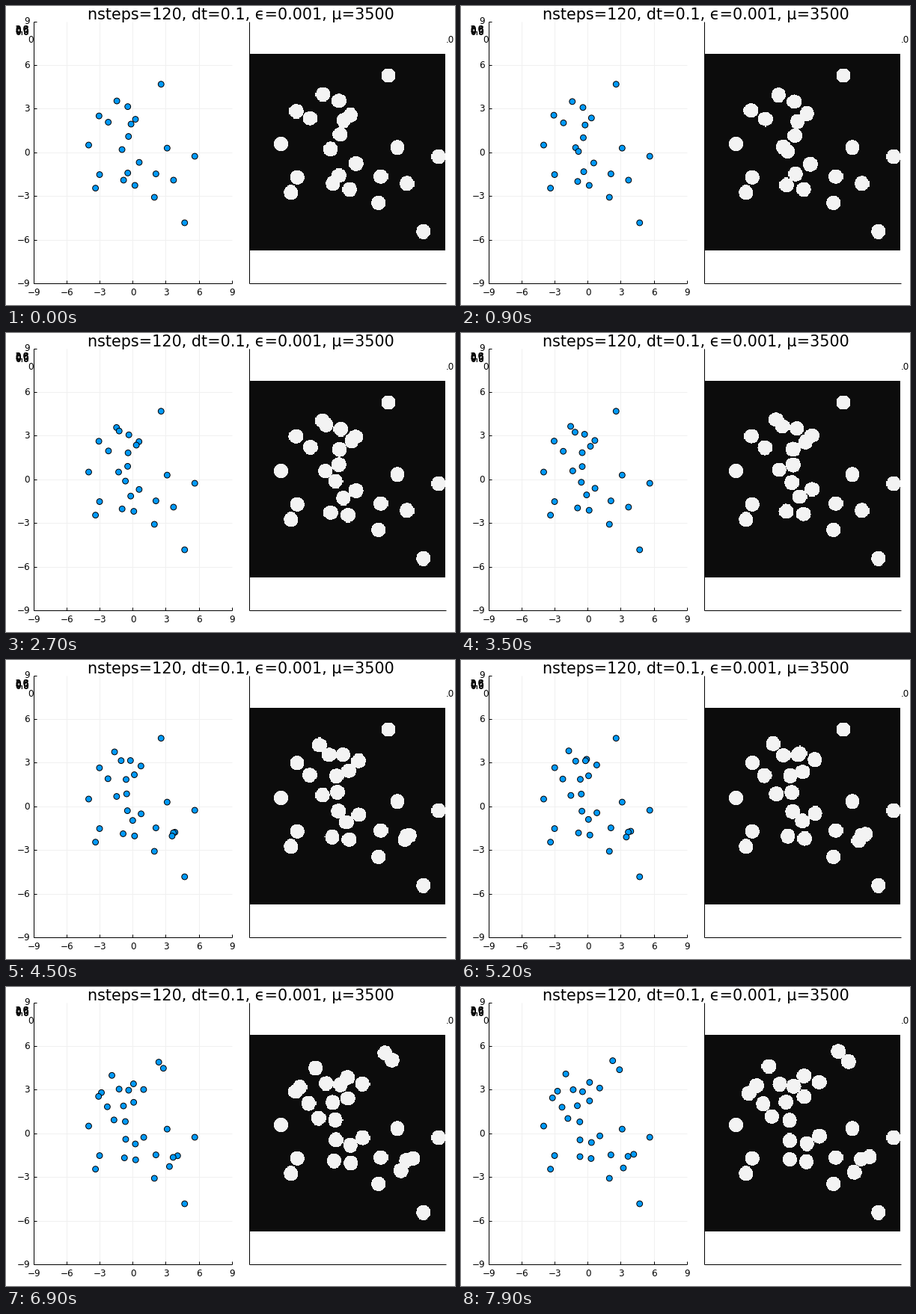
Recreate the animation shown at these times as a matplotlib script. Size 600 by 400 pixels, loop 8 s.

```python
import numpy as np
import matplotlib.pyplot as plt
from matplotlib.animation import FuncAnimation
from matplotlib.patches import Circle

FRAMES = 80
SPEED = 0.01   # drift per frame and axis
RADIUS = 0.45
PX = 0.72      # points per pixel at 100 dpi

LEFT, RIGHT, TOP, BOTTOM = 37, 301.7, 20.5, 371
CX, CY = (LEFT + RIGHT) / 2, (TOP + BOTTOM) / 2
SX, SY = (RIGHT - LEFT) / 18, (BOTTOM - TOP) / 18
FIELD = (325, 587, 326.8, 64.3)


class Cell:
    """Drifts along a heading, may rebound once and may divide."""
    every = []

    def __init__(self, x, y, *head, born=0):
        self.start = np.array([x, y])
        self.head = self.then = np.array(head or (0, 0))
        self.born, self.turn, self.end = born, FRAMES, FRAMES
        Cell.every.append(self)

    def rebound(self, frame, *head):
        self.turn, self.then = frame, np.array(head)
        return self

    def split(self, frame, *heads):
        self.end = frame
        x, y = self.at(frame)
        gap = 5 * SPEED
        return [Cell(x + gap * h[0], y + gap * h[1], *h, born=frame)
                for h in heads]

    def at(self, f):
        before = min(f, self.turn) - self.born
        after = max(f - self.turn, 0)
        return self.start + SPEED * (before * self.head + after * self.then)

    def alive(self, f):
        return self.born <= f < self.end


NW, NE, SW, SE = (-1, 1), (1, 1), (-1, -1), (1, -1)

# Resting cells
for spot in [(-4.03, 0.52), (3.1, 0.31), (5.61, -0.25), (1.94, -3.07),
             (4.69, -4.82), (2.08, -1.46), (-3.04, -1.51), (-3.41, -2.44)]:
    Cell(*spot)

# Jostling cells
Cell(-2.25, 2.09, 0.2, -0.5).rebound(19, -0.25, -0.3)
Cell(-0.18, 1.96, -1, -0.7).rebound(19, -1, 0.15)
Cell(-0.41, 1.11, -0.2, -0.95).rebound(19, -0.5, -0.2)
Cell(0.56, -0.67, -0.45, -0.45).rebound(19, *NE)
Cell(-0.48, -1.40, *NE)
Cell(-0.86, -1.89, -0.9, -1).rebound(19, 0.5, 0.83)
Cell(0.17, -2.25, -0.7, 0).rebound(19, 0.4, 0.9)

# Dividing cells
Cell(2.55, 4.7).split(53, NW, SE)
Cell(3.68, -1.89).split(37, NE, (-0.1, 0.7), SW)
Cell(-0.48, 3.16, 0.2, -0.65).rebound(19, 0.8, 0.5).split(52, NE, SW)
Cell(-3.09, 2.52, -0.2, 0.55).rebound(19, 0.3, 0.15).split(61, NE, SW)
_, low = Cell(-1.0, 0.21).split(1, NW, SE)
low.rebound(45, -0.65, -0.45)
_, low = Cell(-1.47, 3.55, 0.45, -0.45).split(20, NW, SE)
low.rebound(46, -0.85, -0.4)
_, low = Cell(0.22, 2.29, 1, 1).split(20, NE, SW)
low.rebound(59, 0.8, 1)


plt.rcParams["font.family"] = "DejaVu Sans"
fig = plt.figure(figsize=(6, 4), dpi=100, facecolor="white")
ax = fig.add_axes([0, 0, 1, 1])
ax.axis("off")


def line(x0, y0, x1, y1, color="black", z=2):
    ax.plot([x0, x1], [y0, y1], color=color, lw=PX, zorder=z,
            solid_capstyle="butt")


def text(x, y, s, size=11.9, ha="center"):
    ax.text(x, y, s, fontsize=size * PX, ha=ha, va="baseline")


# Axes, grid and tick labels
for v in range(-9, 10, 3):
    x, y = CX + v * SX, CY - v * SY
    label = str(v).replace("-", "\u2212")
    if abs(v) < 9:
        line(x, TOP, x, BOTTOM, "#f0f0f0", 1)
        line(LEFT, y, RIGHT, y, "#f0f0f0", 1)
    line(x, BOTTOM, x, BOTTOM - 4)
    line(LEFT, y, LEFT + 4, y)
    text(x + 0.4, 387, label)
    text(32, y + 4, label, ha="right")
for x0, x1 in [(LEFT, RIGHT), (FIELD[0], 588)]:
    line(x0, TOP, x0, BOTTOM)
    line(x0, BOTTOM, x1, BOTTOM)

# Squeezed labels peeking out behind the plots
for i in range(6):
    text(31, 38.6 - 0.8 * i, f"{i / 5:.1f}", ha="right")
text(29.5, 49.3, "0", ha="left")
text(587.5, 49.3, ".0", ha="left")
text(313.5, 18, "nsteps=120, dt=0.1, \u03f5=0.001, \u03bc=3500", 20.8)

# Occupancy field on [-6, 6]^2
N = 240
edges = np.linspace(-6, 6, N + 1)
gx, gy = np.meshgrid(edges[1:], edges[:0:-1])
field = ax.imshow(np.zeros((N, N)), cmap="gray", vmin=0, vmax=1,
                  extent=FIELD, interpolation="nearest", aspect="auto",
                  zorder=3)
ax.set(xlim=(0, 600), ylim=(400, 0))

dots = [Circle((0, 0), 3.9, fc="#009afa", ec="black", lw=PX, zorder=4)
        for _ in Cell.every]
for dot in dots:
    ax.add_patch(dot)


def update(f):
    mask = np.zeros((N, N), bool)
    for dot, cell in zip(dots, Cell.every):
        dot.set_visible(cell.alive(f))
        if cell.alive(f):
            x, y = cell.at(f)
            dot.center = CX + 0.4 + x * SX, CY + 0.4 - y * SY
            mask |= (gx - x) ** 2 + (gy - y) ** 2 <= RADIUS ** 2
    field.set_data(np.where(mask, 0.95, 0.05))
    return dots + [field]


anim = FuncAnimation(fig, update, frames=FRAMES, interval=100, repeat=True)
plt.show()
```
